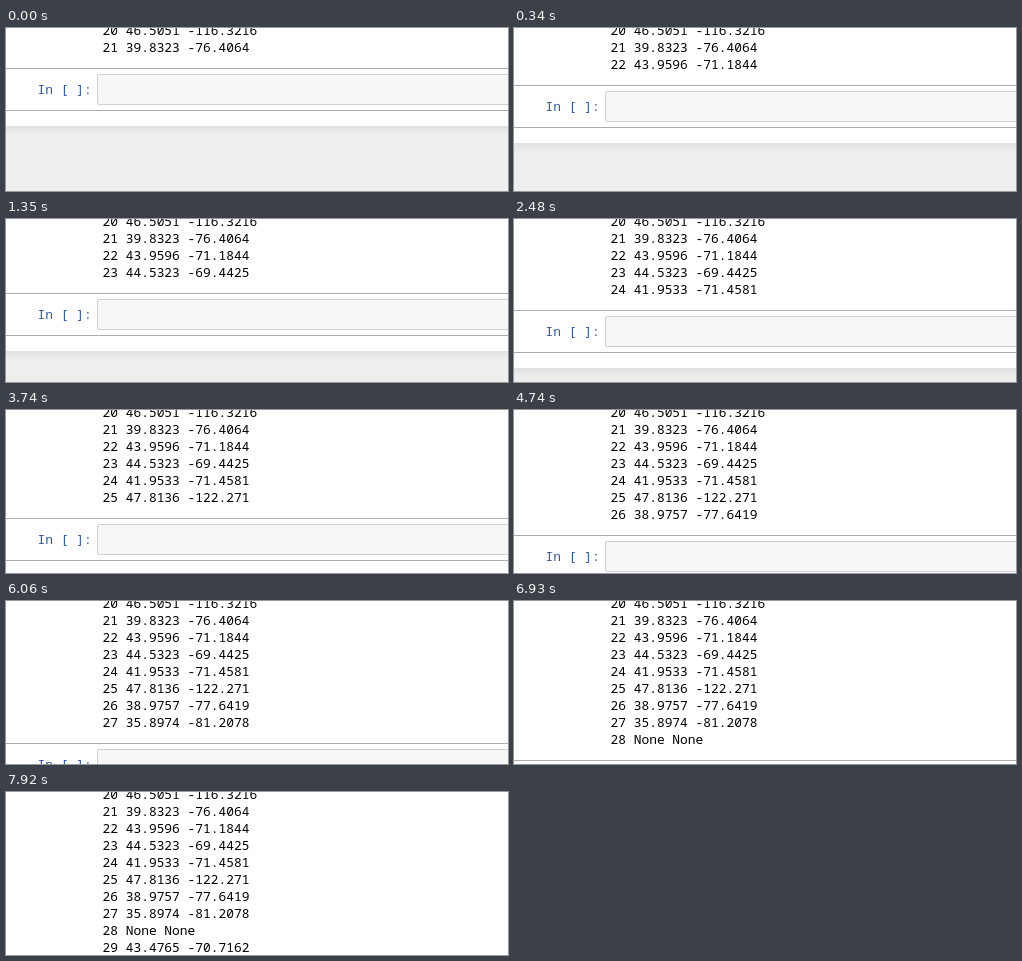
An HTML page for the animation above (8800 ms loop, 502 by 163 pixels).

```html
<!DOCTYPE html>
<html lang="en">
<head>
<meta charset="utf-8">
<title>Notebook output</title>
<style>
  html, body { margin: 0; width: 100%; height: 100%; overflow: hidden; background: #fff; }
  svg { display: block; width: 502px; height: 163px; }
  text { font: 12.9px "Noto Sans Mono", "DejaVu Sans Mono", monospace; white-space: pre; }
  .prompt { fill: #30589f; }
  .rule { fill: #ababab; }

  /* The cell covers rows not yet printed and drops one row (17px) at a time. */
  .cell { animation: print 8.8s step-end infinite; }
  @keyframes print {
    0% { transform: translateY(0); }
    3.8636% { transform: translateY(17px); }
    15.3409% { transform: translateY(34px); }
    28.1818% { transform: translateY(51px); }
    42.5% { transform: translateY(68px); }
    53.8636% { transform: translateY(85px); }
    68.8636% { transform: translateY(102px); }
    78.75% { transform: translateY(119px); }
    90%, 100% { transform: translateY(136px); }
  }
</style>
</head>
<body>
<svg viewBox="0 0 502 163">
  <defs>
    <linearGradient id="shade" x2="0" y2="1">
      <stop offset="0" stop-color="#dfdfdf"/>
      <stop offset=".5" stop-color="#e9e9e9"/>
      <stop offset="1" stop-color="#eee"/>
    </linearGradient>
  </defs>
  <rect width="502" height="163" fill="#fff"/>
  <g id="rows"></g>
  <g class="cell">
    <rect y="28" width="502" height="70" fill="#fff"/>
    <rect class="rule" y="40" width="502" height="1"/>
    <rect class="rule" y="82" width="502" height="1"/>
    <text class="prompt" x="31.6" y="66">In [ ]:</text>
    <rect x="91.5" y="46.5" width="430" height="30" rx="1.5" fill="#f7f7f7" stroke="#cfcfcf"/>
    <rect y="98" width="502" height="200" fill="#eee"/>
    <rect y="98" width="502" height="10" fill="url(#shade)"/>
  </g>
</svg>
<script>
  const lines = [
    "46.5051 -116.3216", "39.8323 -76.4064", "43.9596 -71.1844", "44.5323 -69.4425",
    "41.9533 -71.4581", "47.8136 -122.271", "38.9757 -77.6419", "35.8974 -81.2078",
    "None None", "43.4765 -70.7162"
  ];
  document.getElementById("rows").innerHTML = lines
    .map((line, i) => `<text x="96.5" y="${7 + 17 * i}">${20 + i} ${line}</text>`)
    .join("");
</script>
</body>
</html>
```
